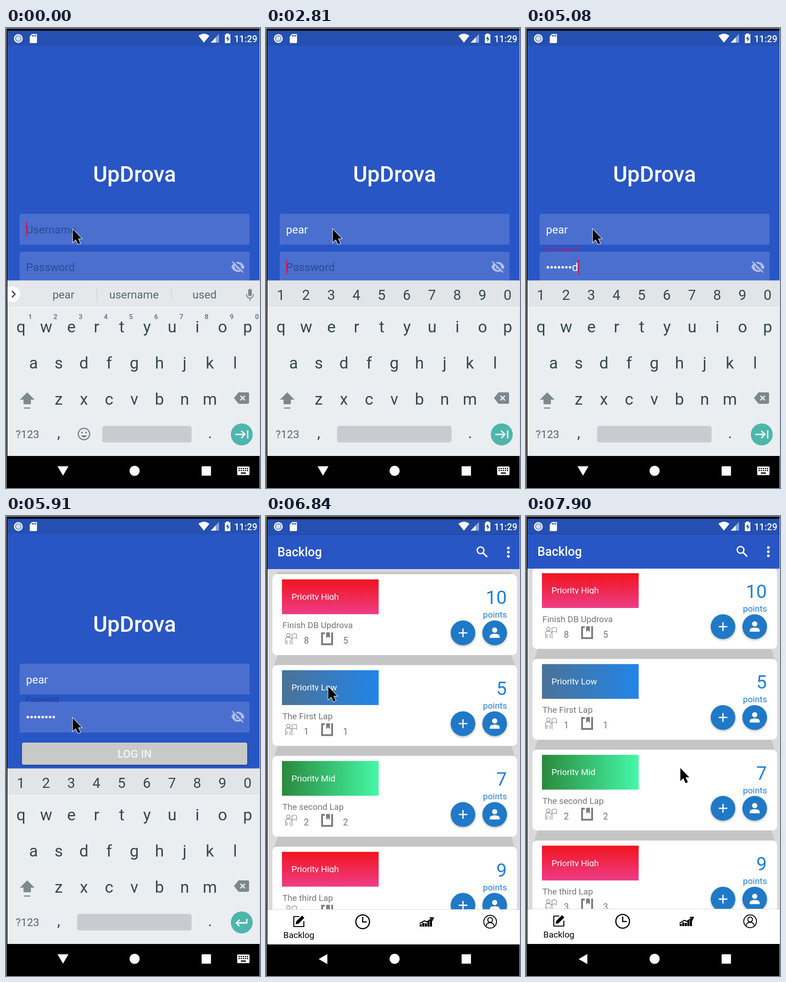
Recreate the animation shown at these times as an HTML page with a canvas. Size 557 by 1005 pixels, loop 8 s.

```html
<!DOCTYPE html>
<html lang="en">
<head>
<meta charset="utf-8">
<title>Login to backlog</title>
<style>
  html, body { margin: 0; width: 100%; height: 100%; overflow: hidden; background: #000; }
  canvas { display: block; width: 557px; height: 1005px; }
</style>
</head>
<body>
<canvas id="stage" width="557" height="1005"></canvas>
<script>
const c = document.getElementById('stage').getContext('2d');
const LOOP = 8000, BLUE = '#2956c5', STATUS = '#2550b1', FIELD = '#4a6fcf';
const KEY = '#37474f', GREY = '#757575', ACCENT = '#1f7ee0';
const LEFT = 3, WIDTH = 553;

// Each track is a list of [start time, value]; values hold until the next entry.
const tracks = {
  mouse: [[0, [146, 439]], [5910, [146, 441]], [6060, [191, 488]], [6220, [212, 512]], [6480, [180, 450]],
    [6600, [150, 395]], [6720, [136, 372]], [7080, [139, 376]], [7240, [177, 341]], [7390, [188, 318]],
    [7540, [230, 390]], [7660, [288, 485]], [7780, [324, 535]], [7900, [338, 550]]],
  name: [[0, ''], [280, 'p'], [2020, 'pe'], [2290, 'pea'], [2410, 'pear']],
  words: [[0, ['pear', 'username', 'used']], [400, ['p', 'please', 'put']], [2020, ['per', 'people', 'pen']],
    [2290, ['peak', 'peace', 'pea']], [2410, ['pear', 'pearls', 'pearl']]],
  typed: [[0, 0], [3770, 1], [3920, 2], [4200, 3], [4320, 4], [4440, 5], [4690, 6], [4810, 7], [5080, 8]],
  lift: [[0, 0], [5360, 37], [5500, 82], [5660, 83.5]],
  fade: [[0, 0], [6600, .35], [6720, .82], [6840, 1]],
  rise: [[0, 48], [6720, 26], [6840, 1], [6960, 0]],
  keysDrop: [[0, 0], [6600, 8], [6720, 23.5]],
  keysAlpha: [[0, 1], [6600, .9], [6720, .72], [6840, 0]],
  scroll: [[0, 0], [7660, 4], [7780, 9], [7900, 12.5]]
};
const at = (name, t) => tracks[name].filter(([start]) => start <= t).pop()[1];
const within = (t, from, to) => t >= from && t < to;

function rect(x, y, w, h, fill, radius = 0) {
  c.fillStyle = fill;
  c.beginPath();
  c.roundRect(x, y, w, h, radius);
  c.fill();
}

function circle(x, y, r, fill, line, width = 2) {
  c.beginPath();
  c.arc(x, y, r, 0, 7);
  if (fill) { c.fillStyle = fill; c.fill(); }
  if (line) { c.strokeStyle = line; c.lineWidth = width; c.stroke(); }
}

function path(d, x, y, fill, line, width = 2) {
  const p = new Path2D(d);
  c.save();
  c.translate(x, y);
  if (fill) { c.fillStyle = fill; c.fill(p); }
  if (line) { c.strokeStyle = line; c.lineWidth = width; c.stroke(p); }
  c.restore();
}

function text(s, x, y, size, color, align = 'left', weight = 400) {
  c.font = `${weight} ${size}px Roboto, sans-serif`;
  c.fillStyle = color;
  c.textAlign = align;
  c.fillText(s, x, y);
}

function shadowed(blur, draw) {
  c.save();
  c.shadowColor = 'rgba(0,0,0,.3)';
  c.shadowBlur = blur;
  c.shadowOffsetY = 2;
  draw();
  c.restore();
}

function statusBar() {
  circle(27, 23, 8.5, '#7f97d6', '#fff', 2.4);
  circle(27, 23, 5, '#d8e0f6');
  path('M5 0H14Q16 0 16 2V18Q16 20 14 20H2Q0 20 0 18V6Z', 52, 13, '#fff');
  for (const x of [58, 61.5, 65]) rect(x - 1, 15, 2, 4, STATUS);
  path('M0 4Q12-5 24 4L12 19Z', 422, 13, '#fff');
  path('M18 0V19H0Z', 449, 13, '#8ca3da');
  path('M11 7.5V19H0Z', 449, 13, '#fff');
  path('M3 2V0H9V2H12V21H0V2Z', 480, 12, '#fff');
  path('M7 5L2.5 12H5.5V18L10 10.5H7Z', 480, 12, STATUS);
  text('11:29', 551, 30.5, 20, '#fff', 'right', 500);
}

function caret(x, y) { rect(x - .5, y, 3, 33, '#c8225f'); }

function hiddenEye() {
  const ink = '#b0bfe9';
  path('M0 11Q5 0 14.5 0Q24 0 29 11Q24 22 14.5 22Q5 22 0 11Z', 494, 511, ink);
  circle(508.5, 522, 6.8, FIELD);
  circle(508.5, 522, 4.2, ink);
  path('M0 0L24 24', 498, 508.5, null, FIELD, 3.4);
  path('M0 0L24 24', 496, 510, null, ink, 2.6);
}

function login(t) {
  const lift = at('lift', t), name = at('name', t), typed = at('typed', t);
  rect(LEFT, 6, WIDTH, 929, BLUE);
  rect(LEFT, 6, WIDTH, 33, STATUS);
  c.save();
  c.translate(0, -lift);
  text('UpDrova', 282, 336, 48, '#fff', 'center', 500);

  rect(30, 406, 504, 67.5, FIELD, [3, 3, 0, 0]);
  text(name || 'Username', 44, 449, 24.2, name ? '#fff' : '#2c4a94');
  if (t < 2810 && !within(t, 950, 1450)) caret(44 + (name && c.measureText(name).width), 423);

  rect(30, 489, 504, 67.5, FIELD, [3, 3, 0, 0]);
  hiddenEye();
  const focused = within(t, 2810, 5360);
  if (t < 2970) text('Password', 44, 531, 24.2, '#2c4a94');
  else text('Password', 44, 489, 16.3, focused ? '#b9215f' : '#203f91');
  const dots = focused ? Math.max(typed - 1, 0) : typed;
  for (let i = 0; i < dots; i++) circle(48 + 8.1 * i, 522.8, 2.8, '#fff');
  const last = focused && typed ? 'password'[typed - 1] : '';
  const lastX = 44 + 8.1 * dots;
  text(last, lastX, 531, 24.2, '#fff');
  if (focused && !within(t, 3340, 3770)) caret(lastX + c.measureText(last).width, 506);

  shadowed(4, () => rect(35, 578.5, 494, 48.5, '#c8caca', 4));
  text('LOG IN', 282, 611.5, 24, '#f4f4f4', 'center', 500);
  text('Dont have an account?', 282, 668.5, 18.8, '#fff', 'center', 500);
  text('Sign up', 282, 694.5, 18.8, '#fff', 'center', 500);
  c.restore();
}

function keyRow(keys, x, y, size = 35.5, color = KEY, weight = 400) {
  [...keys].forEach((key, i) => text(key, x + 55.25 * i, y, size, color, 'center', weight));
}

function keyboard(t) {
  const password = t >= 2810;
  c.save();
  c.globalAlpha = at('keysAlpha', t);
  c.translate(0, at('keysDrop', t));
  rect(LEFT, 551.5, WIDTH, 58.5, password ? '#e1e5e8' : '#e4e8eb');
  rect(LEFT, 610, WIDTH, 325, '#eaeef1');
  rect(LEFT, 609.5, WIDTH, 1.5, '#f5f7f8');
  if (password) {
    keyRow('1234567890', 32.5, 594, 31);
  } else {
    rect(LEFT, 565, 28, 33, '#fff', [0, 16, 16, 0]);
    path('M0 0L7 7L0 14', 13, 574.5, null, KEY, 2.6);
    at('words', t).forEach((word, i) => text(word, 126 + 154.7 * i, 591, 24.4, '#5a686e', 'center'));
    for (const x of [199, 362.5]) rect(x, 565, 1, 33, '#c6ccd0');
    rect(531, 570, 8, 16, '#7d888d', 4);
    path('M0 0Q0 9 7.5 9Q15 9 15 0M7.5 9V15', 527.5, 581, null, '#7d888d', 2.2);
    keyRow('1234567890', 53, 636, 15, '#748085', 700);
    circle(171, 887, 12.5, null, '#748085', 2.4);
    circle(166.5, 884, 1.9, '#748085');
    circle(175.5, 884, 1.9, '#748085');
    path('M0 0Q6.5 9 13 0Z', 164.5, 890, '#748085');
  }
  keyRow('qwertyuiop', 32.8, 665);
  keyRow('asdfghjkl', 60.3, 744);
  keyRow('zxcvbnm', 115.5, 823);
  path('M16 0L32 16H24V26H8V16H0ZM9 33H23V35.5H9Z', 30.5, 796, '#7d888d');
  path('M10 0H30Q33 0 33 3V22Q33 25 30 25H10L0 12.5Z', 500, 796, '#7d888d');
  path('M0 0L10 10M10 0L0 10', 514, 803.5, null, '#eaeef1', 2.6);
  text('?123', 47, 896, 24, '#5a686e', 'center');
  text(',', 115.5, 896, 34, KEY, 'center');
  text('.', 447.5, 896, 34, KEY, 'center');
  const space = password ? 156 : 211;
  rect(space, 869.5, 407 - space, 36, '#c8ccd0', 5);
  circle(517, 888, 24, '#4db6ac');
  if (t < 5500) path('M0 9H21M13 1L21 9L13 17M27 0V18', 503, 879, null, '#fff', 2.8);
  else path('M25 0V9H2M9 2L2 9L9 16', 503, 880, null, '#fff', 2.8);
  c.restore();
}

const PRIORITY = {
  High: ['#f1141d', '#ee3d86', 0, 1],
  Low: ['#4b7297', '#2185e8', 1, 0],
  Mid: ['#2a893d', '#45f8a8', 1, 0]
};
const CARDS = [
  ['High', 'Finish DB Updrova', 10, 8, 5],
  ['Low', 'The First Lap', 5, 1, 1],
  ['Mid', 'The second Lap', 7, 2, 2],
  ['High', 'The third Lap', 9, 3, 3]
];

function card([level, title, points, people, stories], y) {
  path('M22-5H540L536 0H28Z', 0, y, '#c5c5c5');
  path('M28 170H536L545 199H18Z', 0, y, '#c5c5c5');
  rect(14, y, 536.5, 176.5, '#fff', 10);
  const [from, to, dx, dy] = PRIORITY[level];
  const top = y + 11.2;
  const fill = c.createLinearGradient(35, top, 35 + 212 * dx, top + 76 * dy);
  fill.addColorStop(0, from);
  fill.addColorStop(1, to);
  rect(35, top, 212, 76, fill);
  // The label box is too short, so descenders are cut off.
  c.save();
  c.beginPath();
  c.rect(35, top, 212, 45.3);
  c.clip();
  text('Priority ' + level, 56, y + 55.5, 18.9, '#fff');
  c.restore();
  text(title, 36, y + 118, 19, GREY);
  path('M7 2a4 4 0 1 0 .1 0M1 26V14q0-3 4-3h5l5 4M4 26V17M11 26V17M15 27V4q5-3 10 0v9q-5-3-10 0', 42, y + 127, null, '#888', 1.3);
  text(people, 83, y + 152, 19.5, GREY);
  path('M8 2H2V26H24V2H22', 121, y + 127, null, '#7c7c7c', 4);
  path('M11 0h8v13l-4-4-4 4z', 121, y + 127, '#7c7c7c');
  text(stories, 169, y + 152, 19.5, GREY);
  text(points, 528, y + 65, 41, ACCENT, 'right');
  text('points', 528.5, y + 95, 19, ACCENT, 'right');
  for (const x of [432, 501.5]) shadowed(5, () => circle(x, y + 128, 27, '#2079c7'));
  path('M-9.5 0H9.5M0-9.5V9.5', 432, y + 128, null, '#fff', 2.8);
  circle(501.5, y + 122, 5.7, '#fff');
  path('M-11 11V8Q-11 2 0 2Q11 2 11 8V11Z', 501.5, y + 128, '#fff');
}

function bottomIcons() {
  const ink = '#000';
  path('M13 3H1V25H23V13', 60, 871, null, ink, 2.2);
  path('M6 14L19 1L24 6L11 19L5 20Z', 60, 871, ink);
  text('Backlog', 72, 921, 19, ink, 'center');
  circle(212, 885.5, 15, null, ink, 2.6);
  path('M0-10V1H9', 212, 885, null, ink, 2.6);
  [5, 8, 7, 12, 15].forEach((h, i) => rect(337 + 5.6 * i, 896 - h, 4.6, h, ink));
  path('M0 13L10 7L16 9L29 1M22 0.5H30L27 7', 337, 876.5, null, ink, 2.4);
  circle(491.5, 885.5, 14, null, ink, 2);
  circle(491.5, 881.5, 5.2, null, ink, 2);
  path('M-9 10Q-8 2 0 2Q8 2 9 10', 491.5, 885.5, null, ink, 2);
}

function backlog(t) {
  const loaded = t >= 6840, navTop = loaded ? 858.5 : 826;
  c.save();
  c.globalAlpha = at('fade', t);
  c.translate(0, at('rise', t));
  rect(LEFT, 6, WIDTH, 33.5, STATUS);
  rect(LEFT, 39.5, WIDTH, 75.5, BLUE);
  rect(LEFT, 115, WIDTH, navTop - 115, loaded ? '#dad9db' : '#fafafa');
  if (loaded) {
    c.save();
    c.beginPath();
    c.rect(LEFT, 115, WIDTH, navTop - 115);
    c.clip();
    CARDS.forEach((item, i) => card(item, 126.3 - at('scroll', t) + 198.4 * i));
    c.restore();
  }
  text('Backlog', 25, 87.3, 27, '#fff', 'left', 500);
  circle(470.5, 74, 7.3, null, '#fff', 2.8);
  path('M0 0L9.5 9.5', 475.5, 79, null, '#fff', 3.4);
  for (const y of [69, 78, 87]) circle(531.5, y, 2.9, '#fff');
  c.globalAlpha = 1;
  rect(LEFT, navTop, WIDTH, 935 - navTop, loaded ? '#fff' : '#d2cfc6');
  bottomIcons();
  c.restore();
}

function systemNav(t) {
  if (t < 6600) {
    path('M0 0H24L12 20.5Z', 113, 957.5, '#fff');
    rect(507, 958, 27, 19, '#fff', 2);
    for (let i = 0; i < 10; i++) rect(510 + 4.6 * (i % 5), 961 + 4.5 * (i / 5 | 0), 2.6, 2.6, '#000');
    rect(515, 971, 11, 2.6, '#000');
  } else {
    path('M19 0V22L0 11Z', 115.5, 957, '#fff');
  }
  circle(282, 967.5, 11, '#fff');
  rect(429, 957.5, 20.5, 20.5, '#fff', 1);
}

function mouse(t) {
  const [x, y] = at('mouse', t), arrow = 'M.5 .5V29L7 23L12 33.5L17 31.5L12 21H20Z';
  path(arrow, x, y, null, '#fff', 2);
  path(arrow, x, y, '#000');
}

function windowBorder() {
  const edge = '#d8d8d8';
  rect(0, 0, 557, 1, edge);
  rect(0, 0, 1, 1005, edge);
  rect(556, 0, 1, 1005, edge);
}

function draw(t) {
  c.globalAlpha = 1;
  rect(0, 0, 557, 1005, '#000');
  c.save();
  c.beginPath();
  c.rect(LEFT, 6, WIDTH, 953);
  c.clip();
  if (t < 6840) login(t);
  if (t >= 6600) backlog(t);
  if (t < 6840) keyboard(t);
  statusBar();
  c.restore();
  windowBorder();
  systemNav(t);
  mouse(t);
}

function tick(now) {
  draw(now % LOOP);
  requestAnimationFrame(tick);
}
draw(0);
requestAnimationFrame(tick);
</script>
</body>
</html>
```
